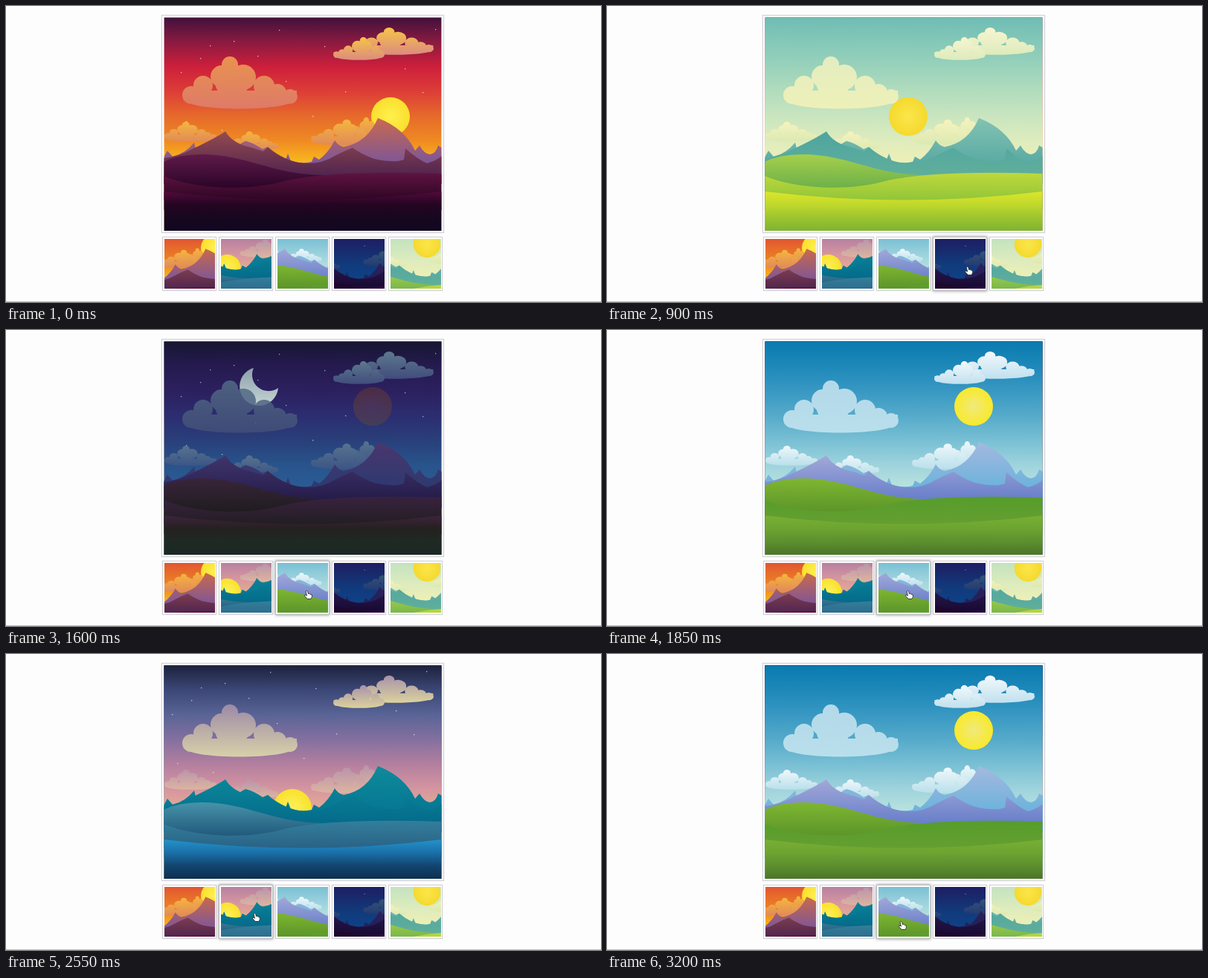
An HTML page with a canvas for the animation above (3.25 s loop, 800 by 399 pixels).

```html
<!DOCTYPE html>
<html>
<head>
<meta charset="utf-8">
<style>
html, body { margin: 0; width: 100%; height: 100%; overflow: hidden; background: #fefdfe; }
canvas { display: block; }
</style>
</head>
<body>
<canvas id="stage" width="800" height="399"></canvas>
<script>
const stage = document.getElementById('stage').getContext('2d');
const LOOP = 3250, R = 26;

// Each list of colours runs from the top of a shape to its bottom.
const palettes = {
  sunset: {
    sky: ['#40113c', '#8a1a40', '#cd1f3b', '#dd3d37', '#e66a2b', '#ef8a22', '#fbc01c'],
    sun: [517, 149], glow: ['#fff04d', '#fadf2e'], stars: [0, 0],
    big: ['#e9924f', '#dd7a68'], high: ['#f6c545', '#dc8b80'], low: ['#f5b63e', '#e18a58'],
    back: ['#c8694e', '#7d5698'], front: ['#944a4f', '#54264f'],
    hills: [['#5f1a49', '#2a0428'], ['#601342', '#27041f'], ['#520a3a', '#240522', '#170720', '#110620']],
    crop: [421, 132]
  },
  dusk: {
    sky: ['#1d213b', '#3b4776', '#596496', '#83709f', '#b37f9f', '#d595a0', '#e8b08f'],
    sun: [385, 208], glow: ['#fff05a', '#f8e22d'], stars: [-12, -8],
    big: ['#9c8aa6', '#d8d1a9'], high: ['#a892aa', '#dcd29c'], low: ['#b995aa', '#ddb4a0'],
    back: ['#0f8a9b', '#067793'], front: ['#0b8699', '#046c8b'],
    hills: [['#4793aa', '#20587a'], ['#347f9b', '#285f84'], ['#2492cb', '#1a70a8', '#12456f', '#0d2f50']],
    crop: [373, 152]
  },
  day: {
    sky: ['#0b7ab0', '#1d88b9', '#3898c2', '#55aaca', '#78bfd4', '#9ed3dd', '#bce4de'],
    sun: [493, 103], glow: ['#f0ea7c', '#f9e92b'],
    big: ['#b3d9e9', '#b9dfec'], high: ['#f3f9fc', '#c0e0ee'], low: ['#eff8fb', '#b9dfea'],
    back: ['#a4b8df', '#6cb3dc'], front: ['#a2a8d8', '#6a80ca'],
    hills: [['#7eb631', '#5c942a'], ['#569d2b', '#669f31'], ['#78af32', '#6da432', '#5c8f2e', '#4c742a']],
    crop: [281, 150]
  },
  night: {
    sky: ['#1a0219', '#27053a', '#2a084b', '#24145e', '#1a2669', '#113a7b', '#0e4288'],
    moon: true, stars: [0, 0],
    big: ['#3b5672d4', '#29305fd4'], high: ['#3f6078', '#282f66'], low: ['#395878', '#233a72'],
    back: ['#3a1c58', '#20225a'], front: ['#2d1e56', '#190a34'],
    hills: [['#2b083d', '#13041d'], ['#340a45', '#13041b'], ['#33083f', '#17061e', '#131621', '#121926']],
    crop: [354, 135]
  },
  morning: {
    sky: ['#6fbcb4', '#84c8b8', '#99d2bb', '#b2dcbd', '#c9e5bf', '#deecbd', '#f0f0b4'],
    sun: [405, 149], glow: ['#fbe64a', '#f5d92e'],
    big: ['#e3edc0', '#eef0b8'], high: ['#f8f5cf', '#dcebbc'], low: ['#f7f3bd', '#dbe9b2'],
    back: ['#82c2b2', '#5aaaa4'], front: ['#4ea59f', '#5fae9c'],
    hills: [['#a6cf4b', '#6cb04a'], ['#c0d93c', '#8cc338'], ['#dce62a', '#c0d82c', '#9cc52f', '#7fb331']],
    crop: [335, 139]
  }
};
const names = ['sunset', 'dusk', 'day', 'night', 'morning'];

const stars = [[235, 89], [261, 70], [274, 53], [306, 47], [367, 32], [338, 67], [428, 54], [376, 101],
  [456, 115], [536, 84], [577, 31], [290, 167], [412, 148], [560, 116], [335, 125], [242, 155]];

const backRidge = new Path2D(`M212 240V204L217 195 224 203Q241 199 253 184L255 192 308 190 322 182
  Q334 185 345 193L352 190 363 202 376 207 379 199 383 209Q398 213 411 210L414 203 421 207
  Q434 197 442 181Q446 188 454 190Q486 184 500 151Q536 165 550 195L556 188Q562 199 570 200
  Q578 199 581 188L586 191V240Z`);
const frontRidge = new Path2D(`M212 240V205Q232 203 250 193Q280 179 295 169Q305 186 331 191
  L346 196 352 190Q374 209 400 212Q426 213 442 202Q456 195 466 191Q478 200 495 206
  Q522 212 535 207L537 192Q554 207 566 212Q578 209 586 202V240Z`);
const hills = [
  ['M212 210Q232 200 262 200C325 200 358 228 430 228V262H212Z', 200, 246],
  ['M212 229C250 246 325 251 378 235Q445 221 586 226V275H212Z', 224, 266],
  ['M212 250Q400 273 586 250V304H212Z', 250, 303]
].map(([d, top, bottom]) => [new Path2D(d), top, bottom]);
const moon = new Path2D('M333 51A26 26 0 1 0 366 78A22 22 0 0 1 333 51Z');
const hand = new Path2D(`M-3.5 -5.5Q-2 -7.5 -.5 -5.5L.5 -1.5Q2 -3 3 -1Q4.5 -2 5 0Q6.5 -.5 6.5 1.5
  L6 4 4.5 6.5H-1L-5.5 1.5Q-5.5 -.5 -3 .5L-1.8 1.5Z`);

// Bumps of a cloud that is 155 wide and 71 high: centre and radius.
const puff = new Path2D('M2 46H154V57C148 75 5 75 1 57Z');
const bumps = [[12, 52, 12], [28, 39, 13], [53, 27, 15], [64, 11, 11], [67, 34, 23], [82, 28, 17],
  [110, 40, 14], [128, 49, 12], [145, 54, 10]];
for (const [x, y, r] of bumps) {
  puff.moveTo(x + r, y);
  puff.arc(x, y, r, 0, 7);
}

function vertical(c, top, bottom, colors) {
  const g = c.createLinearGradient(0, top, 0, bottom);
  colors.forEach((color, i) => g.addColorStop(i / (colors.length - 1), color));
  return g;
}

function cloud(c, x, y, w, h, colors, flip) {
  c.save();
  c.translate(flip ? x + w : x, y);
  c.scale((flip ? -w : w) / 155, h / 71);
  c.fillStyle = vertical(c, 0, 71, colors);
  c.fill(puff);
  c.restore();
}

function landscape(c, p) {
  c.fillStyle = vertical(c, 15, 215, p.sky);
  c.fillRect(212, 15, 374, 288);
  if (p.stars) {
    c.fillStyle = '#ffffffb0';
    for (const [x, y] of stars) c.fillRect(x + p.stars[0], y + p.stars[1], 1.3, 1.3);
  }
  if (p.sun) {
    const [x, y] = p.sun, g = c.createRadialGradient(x, y, 0, x, y, R);
    p.glow.forEach((color, i) => g.addColorStop(i, color));
    c.fillStyle = g;
    c.beginPath();
    c.arc(x, y, R, 0, 7);
    c.fill();
  }
  if (p.moon) {
    c.fillStyle = vertical(c, 51, 103, ['#a4a5a6', '#dfe1da']);
    c.fill(moon);
  }
  cloud(c, 237, 68, 155, 71, p.big);
  cloud(c, 473, 29, 102, 37, p.high);
  cloud(c, 440, 42, 69, 31, p.high, true);
  cloud(c, 213, 156, 70, 27, p.low);
  cloud(c, 300, 169, 66, 26, p.low);
  cloud(c, 462, 150, 54, 32, p.low);
  cloud(c, 410, 153, 82, 35, p.low, true);
  c.fillStyle = vertical(c, 152, 212, p.back);
  c.fill(backRidge);
  c.fillStyle = vertical(c, 170, 226, p.front);
  c.fill(frontRidge);
  hills.forEach(([path, top, bottom], i) => {
    c.fillStyle = vertical(c, top, bottom, p.hills[i]);
    c.fill(path);
  });
}

// Paints one landscape on its own layer, seen through a window on the stage.
function layer(p, x, y, w, h, crop, scale) {
  const canvas = document.createElement('canvas');
  canvas.width = 800;
  canvas.height = 399;
  const c = canvas.getContext('2d');
  c.beginPath();
  c.rect(x, y, w, h);
  c.clip();
  c.translate(x, y);
  c.scale(scale, scale);
  c.translate(-crop[0], -crop[1]);
  landscape(c, p);
  return canvas;
}

function card(c, x, y, w, h, hover) {
  c.save();
  c.shadowColor = hover ? '#0007' : '#0002';
  c.shadowBlur = hover ? 4 : 1;
  c.fillStyle = '#fff';
  c.fillRect(x, y, w, h);
  c.restore();
  c.strokeStyle = hover ? '#bcbcc0' : '#d0d0d4';
  c.lineWidth = 1;
  c.strokeRect(x + .5, y + .5, w - 1, h - 1);
}

const thumbX = i => 213 + Math.round(i * 76.1);

const scenes = {}, thumbs = {};
names.forEach((name, i) => {
  const p = palettes[name];
  scenes[name] = layer(p, 212.6, 15.5, 372.8, 287.5, [212.6, 15.5], 1);
  thumbs[name] = layer(p, thumbX(i), 314, 68, 67, p.crop, .7);
});

// Start time of each crossfade and the scene it brings in.
const FADE = 250;
const shows = [[-FADE, 'sunset'], [650, 'morning'], [980, 'night'], [1560, 'day'], [2220, 'dusk'], [2900, 'day']];

// Time and position of the pointer.
const pointer = [[200, 548, 408], [500, 530, 351], [800, 530, 351], [980, 456, 361], [1350, 456, 361],
  [1560, 406, 357], [1950, 406, 357], [2150, 336, 355], [2700, 336, 355], [2880, 397, 366], [LOOP, 397, 366]];

const ease = k => k * k * (3 - 2 * k);

function pointerAt(t) {
  const i = pointer.findIndex(k => k[0] > t);
  if (i < 1) return null;
  const [t0, x0, y0] = pointer[i - 1], [t1, x1, y1] = pointer[i];
  const k = ease((t - t0) / (t1 - t0));
  return [x0 + (x1 - x0) * k, y0 + (y1 - y0) * k];
}

function render(t) {
  const c = stage, at = pointerAt(t);
  c.fillStyle = '#fefdfe';
  c.fillRect(0, 0, 800, 399);
  c.fillStyle = '#bdbdc1';
  c.fillRect(0, 398, 800, 1);

  card(c, 209, 12, 380, 294);
  for (const [start, name] of shows) {
    if (t < start) break;
    c.globalAlpha = Math.min(1, (t - start) / FADE);
    c.drawImage(scenes[name], 0, 0);
  }
  c.globalAlpha = 1;

  names.forEach((name, i) => {
    const x = thumbX(i) - 3;
    const hover = at && at[0] > x && at[0] < x + 73 && at[1] > 311 && at[1] < 389;
    card(c, x, 311, 73, 73, hover);
    c.drawImage(thumbs[name], 0, 0);
  });

  if (at) {
    c.save();
    c.translate(...at);
    c.scale(.85, .85);
    c.fillStyle = '#fff';
    c.strokeStyle = '#222';
    c.lineWidth = 1;
    c.fill(hand);
    c.stroke(hand);
    c.restore();
  }
}

const begin = performance.now();
function tick() {
  render((performance.now() - begin) % LOOP);
  requestAnimationFrame(tick);
}
tick();
</script>
</body>
</html>
```
